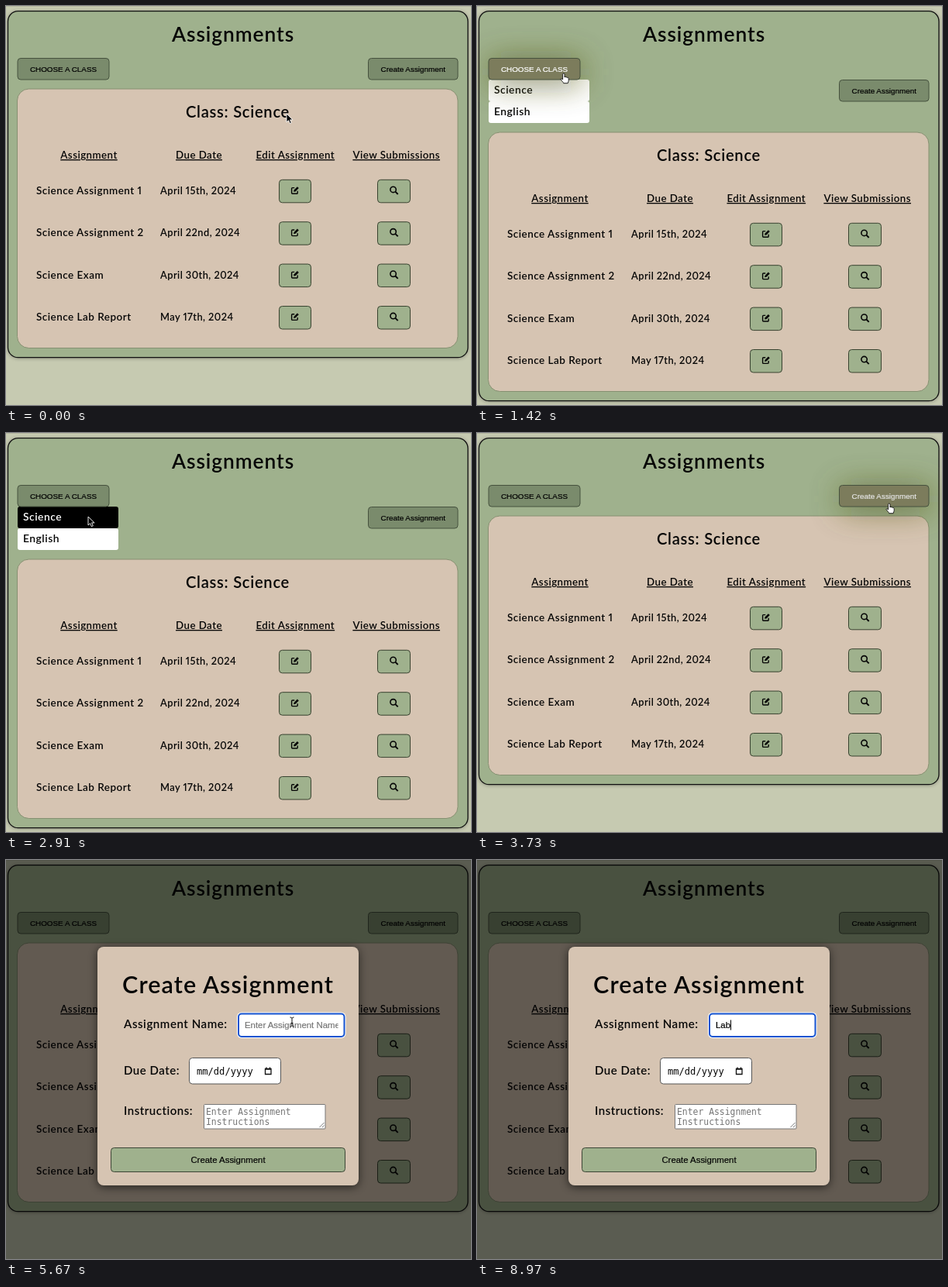
An HTML page for the animation above (9000 ms loop, 600 px wide and 515 px high).

```html
<!DOCTYPE html>
<html lang="en">
<head>
<meta charset="utf-8">
<title>Assignments</title>
<style>
html, body { margin: 0; width: 100%; height: 100%; overflow: hidden; background: #c6cab1; }
svg { display: block; }
text { font: 600 13.5px Lato, sans-serif; font-variant-numeric: proportional-nums; letter-spacing: .035em; fill: #060606; white-space: pre; }
.mid { text-anchor: middle; }
.head { font-size: 13.3px; text-decoration: underline; }
.ui { font: 400 9.9px "Liberation Sans", Arial, sans-serif; letter-spacing: 0; stroke: currentColor; stroke-width: .2px; }
.mono { font: 400 11.4px "DejaVu Sans Mono", monospace; letter-spacing: 0; }
.hint { fill: #757575; color: #757575; }
</style>
</head>
<body>
<svg id="stage" width="600" height="515" viewBox="0 0 600 515"></svg>
<script>
const LOOP = 9000;
const OPEN = 1250, CLOSE = 3050, MODAL = 4000, FOCUS = 5150;
const KEYS = [[8000, 'L'], [8300, 'La'], [8550, 'Lab']];
// time, x, y of the pointer's hot spot
const PATH = [
  [0, 362, 139], [850, 147, 80], [1050, 112, 87], [1900, 112, 87],
  [2350, 106, 108], [3080, 106, 108], [3600, 532, 91], [4050, 532, 91],
  [4500, 425, 165], [4950, 369, 209], [9000, 369, 209]
];

const rect = (x, y, w, h, r, fill, stroke = 'none', more = '') =>
  `<rect x="${x}" y="${y}" width="${w}" height="${h}" rx="${r}" fill="${fill}" stroke="${stroke}" ${more}/>`;
const text = (x, y, s, cls = '', size = 0, more = '') =>
  `<text x="${x}" y="${y}" class="${cls}" ${size ? `style="font-size:${size}px"` : ''} ${more}>${s}</text>`;
const group = (id, inner) => `<g id="${id}">${inner}</g>`;
const blur = (id, size) =>
  `<filter id="${id}" x="-100%" y="-300%" width="300%" height="700%"><feGaussianBlur stdDeviation="${size}"/></filter>`;

const hoverButton = (id, x, w, label) => group(id,
  rect(x + 2, 71, w, 28, 5, '#4d5112', 'none', 'class="glow" filter="url(#wide)"') +
  rect(x, 67.5, w, 27.5, 4, '#7a8b6c', '#46523e', 'class="face"') +
  text(x + w / 2, 84.5, label, 'ui mid'));

const iconButton = (x, y, w, icon) =>
  rect(x, y - 14.5, w, 29.5, 4, '#9fb18d', '#38422f') +
  `<g transform="translate(${x + w / 2} ${y})" fill="none" stroke="#060606">${icon}</g>`;
const PEN = '<path d="M-.8-4.2h-2.6a1 1 0 0 0-1 1v5.6a1 1 0 0 0 1 1h5.6a1 1 0 0 0 1-1V0" stroke-width="1.4"/>' +
  '<path d="M-1.9 1l.5-2.3 4.3-4.3 1.9 1.9-4.3 4.3z" fill="#060606" stroke="none"/>';
const LENS = '<circle cx="-.9" cy="-1.9" r="3.7" stroke-width="1.6"/><path d="M1.9 .9L5.2 4.2" stroke-width="1.9"/>';

const rows = [
  ['Science Assignment 1', 'April 15th, 2024'],
  ['Science Assignment 2', 'April 22nd, 2024'],
  ['Science Exam', 'April 30th, 2024'],
  ['Science Lab Report', 'May 17th, 2024']
].map(([name, due], i) => {
  const y = 238.8 + i * 54.4;
  return text(39, y + 4.2, name) + text(199, y + 4.2, due, '', 12.8) +
    iconButton(352.5, y, 41, PEN) + iconButton(479.5, y, 42, LENS);
}).join('');

const heads = [['Assignment', 107], ['Due Date', 249], ['Edit Assignment', 373.3], ['View Submissions', 503.7]]
  .map(([s, x]) => text(x, 197, s, 'head mid')).join('');

const panel = rect(14.5, 107, 568.5, 334.5, 15, '#d6c4b2', '#869071') +
  text(299, 144.3, 'Class: Science', 'mid', 20.2) + heads + rows;

const option = (id, y, label) => group(id, rect(15, y, 130, 28, 3, '#fff') + text(22, y + 18.3, label, '', 13.9));

const modal = rect(0, 0, 600, 515, 0, '#000', 'none', 'opacity=".54"') +
  rect(118, 114, 337, 308, 8, '#000', 'none', 'opacity=".6" filter="url(#soft)"') +
  rect(118, 112, 337, 308, 8, '#d6c4b2') +
  text(286.5, 172, 'Create Assignment', 'mid', 30.6) +
  text(152, 217, 'Assignment Name:', '', 15.1) +
  text(152, 277, 'Due Date:', '', 15) +
  text(152, 329, 'Instructions:', '', 15) +
  rect(298, 196.5, 140.5, 33.5, 6, '#fff', 'none', 'id="halo"') +
  rect(300, 198.5, 136.5, 29.5, 4, '#fff', '#666', 'id="field"') +
  text(308, 217, 'Enter Assignment Name', 'ui hint', 11.4, 'id="typed" clip-path="url(#fieldClip)"') +
  rect(308, 206.5, 1, 13, 0, '#000', 'none', 'id="caret"') +
  rect(236.5, 255.5, 118, 33.5, 4, '#fff', '#555') +
  text(246, 276.5, 'mm/dd/yyyy', 'mono', 12.1) +
  '<path d="M334.5 269.5h7.5v7h-7.5zM334 270h8.5M336 267.5v2M340.5 267.5v2" fill="none" stroke="#111" stroke-width="1.3"/>' +
  rect(255.5, 315.5, 156.5, 31.5, 1, '#fff', '#767676') +
  text(258, 329, 'Enter Assignment', 'mono hint') + text(258, 342, 'Instructions', 'mono hint') +
  '<path d="M404.5 345l6-6M408 345l2.5-2.5" stroke="#777"/>' +
  rect(135.5, 371.5, 302, 31, 4, '#9fb18d', '#3c4535') +
  text(286.5, 390.5, 'Create Assignment', 'ui mid', 11.4);

const pointers =
  group('arrow', '<path d="M0 0v11l2.6-2.3 1.7 3.9 2-.9-1.7-3.8h3.5z" fill="#000" stroke="#fff" stroke-width=".9"/>') +
  group('hand', '<path d="M-1.4 8V1.2a1.2 1.2 0 0 1 2.4 0V5c.2-.9 1.8-.8 2 .2.4-.7 1.7-.4 1.8.5.6-.5 1.4 0 1.4.8v2.8c0 1.2-.9 1.8-1 3.4H-.3c-.4-1.6-2.2-2.8-3.6-5-.5-1 .9-1.7 2.5.3z" fill="#fff" stroke="#111" stroke-width=".9"/>') +
  group('beam', '<path d="M-2.5-6q2 0 2.5 1.2Q.5-6 2.5-6M0-5V5M-2.5 6q2 0 2.5-1.2Q.5 6 2.5 6M-1.5 1.5h3" fill="none" stroke="#111"/>');

const stage = document.getElementById('stage');
stage.innerHTML = `<defs>${blur('wide', 21) + blur('soft', 6) + blur('tight', 2.5)}
  <clipPath id="fieldClip"><rect x="304" y="200" width="124.5" height="27"/></clipPath></defs>` +
  rect(0, 0, 600, 515, 0, '#c6cab1') + rect(0, 0, 600, 1, 0, '#b4b7a0') +
  rect(2.5, 7, 593.5, 447.5, 13, '#000', 'none', 'id="shade" opacity=".35" filter="url(#tight)"') +
  rect(2.5, 6.7, 593.5, 447, 13, '#9fb18d', '#111', 'id="card" stroke-width="1.3"') +
  text(293, 46, 'Assignments', 'mid', 26.4) +
  group('panel', panel) +
  group('menu', option('science', 95, 'Science') + option('english', 123, 'English')) +
  hoverButton('choose', 15, 118, 'CHOOSE A CLASS') +
  hoverButton('create', 467.5, 115.5, 'Create Assignment') +
  group('modal', modal) + group('pointer', pointers);

const el = id => document.getElementById(id);
const show = (id, on) => el(id).setAttribute('display', on ? 'inline' : 'none');
const set = (id, attrs) => { for (const k in attrs) el(id).setAttribute(k, attrs[k]); };
const ink = (node, colour) => { node.style.fill = node.style.color = colour; };
const ramp = (t, from, span) => Math.min(1, Math.max(0, (t - from) / span));
const ease = u => u * u * (3 - 2 * u);
const mix = (a, b, u) => `rgb(${a.map((v, i) => Math.round(v + (b[i] - v) * u))})`;

function place(t) {
  const i = PATH.findIndex(p => p[0] > t);
  const [t0, x0, y0] = PATH[i - 1], [t1, x1, y1] = PATH[i];
  const u = ease((t - t0) / (t1 - t0));
  return [x0 + (x1 - x0) * u, y0 + (y1 - y0) * u];
}

function hover(id, face, glow) {
  const part = s => el(id).querySelector(s);
  part('.face').setAttribute('fill', mix([122, 139, 108], [124, 124, 92], face));
  part('.glow').setAttribute('opacity', .78 * glow);
  ink(part('text'), mix([0, 0, 0], [255, 255, 255], glow));
}

function draw(t) {
  const open = t >= OPEN && t < CLOSE, popped = t >= MODAL, focused = t >= FOCUS;
  const [x, y] = place(t);

  const drop = open ? 56 : 0;
  set('card', { height: 447 + drop });
  set('shade', { height: 447.5 + drop });
  set('panel', { transform: `translate(0 ${drop})` });
  set('create', { transform: `translate(0 ${drop / 2})` });
  show('menu', open);

  const out = ramp(t, 2130, 400);
  hover('choose', ramp(t, 760, 90) - out, ramp(t, 900, 400) - out);
  const leave = ramp(t, MODAL, 300);
  hover('create', ramp(t, 3460, 90) - leave, ramp(t, 3460, 300) - leave);

  const picked = open && t > 2130 && y > 95;
  el('science').firstChild.setAttribute('fill', picked ? '#000' : '#fff');
  ink(el('science').lastChild, picked ? '#fff' : '#060606');

  show('modal', popped);
  show('halo', focused);
  set('field', { stroke: focused ? '#1553d0' : '#666', 'stroke-width': focused ? 2 : 1 });
  const key = KEYS.filter(k => t >= k[0]).pop();
  const typed = el('typed');
  typed.textContent = key ? key[1] : 'Enter Assignment Name';
  ink(typed, key ? '#000' : '#757575');
  set('caret', { x: 308 + (key ? key[1].length * 6.34 : 0) });
  show('caret', focused && (t - (key ? key[0] : FOCUS)) % 1000 < 500);

  const onButton = !popped && y < 95 && ((x > 15 && x < 133) || (x > 467 && x < 583));
  const onField = popped && x > 300 && x < 437 && y > 198 && y < 228;
  set('pointer', { transform: `translate(${x} ${y})` });
  show('pointer', !key);
  show('hand', onButton);
  show('beam', onField);
  show('arrow', !onButton && !onField);
}

const start = performance.now();
function tick() {
  draw((performance.now() - start) % LOOP);
  requestAnimationFrame(tick);
}
tick();
</script>
</body>
</html>
```
